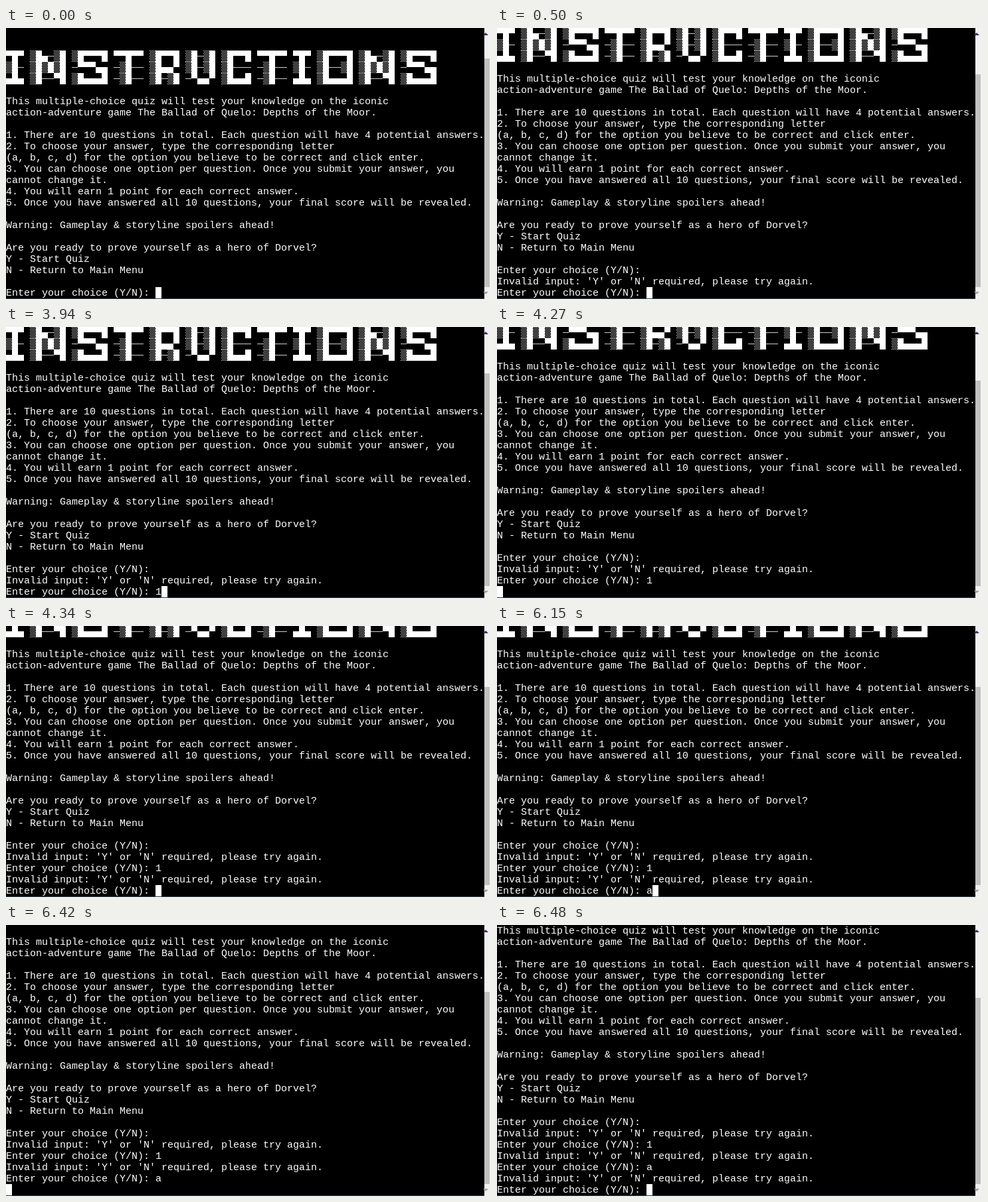
Recreate the animation shown at these times as an HTML page with a canvas. Size 730 px wide and 409 px high, loop 8 s.

```html
<!DOCTYPE html>
<html lang="en">
<head>
<meta charset="utf-8">
<style>
  html, body { margin: 0; overflow: hidden; background: #000; }
  canvas { display: block; }
</style>
</head>
<body>
<canvas id="screen" width="730" height="409"></canvas>
<script>
const ctx = document.getElementById('screen').getContext('2d');
const LOOP = 8000, COL = 9, ROW = 17, ROWS = 24, SCROLLED_OFF = 2;

const PROMPT = 'Enter your choice (Y/N): ';
const RETRY = "Invalid input: 'Y' or 'N' required, please try again.\n" + PROMPT;
const INTRO = `

▀█▀ ▒█▄─▒█ ▒█▀▀▀█ ▀▀█▀▀ ▒█▀▀█ ▒█─▒█ ▒█▀▀█ ▀▀█▀▀ ▀█▀ ▒█▀▀▀█ ▒█▄─▒█ ▒█▀▀▀█
▒█─ ▒█▒█▒█ ─▀▀▀▄▄ ─▒█── ▒█▄▄▀ ▒█─▒█ ▒█─── ─▒█── ▒█─ ▒█──▒█ ▒█▒█▒█ ─▀▀▀▄▄
▄█▄ ▒█──▀█ ▒█▄▄▄█ ─▒█── ▒█─▒█ ─▀▄▄▀ ▒█▄▄█ ─▒█── ▄█▄ ▒█▄▄▄█ ▒█──▀█ ▒█▄▄▄█

This multiple-choice quiz will test your knowledge on the iconic
action-adventure game The Ballad of Quelo: Depths of the Moor.

1. There are 10 questions in total. Each question will have 4 potential answers.
2. To choose your answer, type the corresponding letter
(a, b, c, d) for the option you believe to be correct and click enter.
3. You can choose one option per question. Once you submit your answer, you
cannot change it.
4. You will earn 1 point for each correct answer.
5. Once you have answered all 10 questions, your final score will be revealed.

Warning: Gameplay & storyline spoilers ahead!

Are you ready to prove yourself as a hero of Dorvel?
Y - Start Quiz
N - Return to Main Menu

${PROMPT}`;

// Terminal output in order: [time in ms, appended text]
const OUTPUT = [
  [0, INTRO],
  [500, '\n' + RETRY],
  [3940, '1'],
  [4270, '\n'],
  [4340, RETRY],
  [6150, 'a'],
  [6420, '\n'],
  [6480, RETRY],
];

function rect(color, x, y, w, h) {
  ctx.fillStyle = color;
  ctx.fillRect(x, y, w, h);
}

function drawBlock(char, x, y) {
  if (char === '█') rect('#fff', x, y, COL, ROW);
  if (char === '▀') rect('#fff', x, y, COL, 8);
  if (char === '▄') rect('#fff', x, y + 8, COL, 9);
  if (char === '─') rect('#ccc', x, y + 8, COL, 1);
  if (char === '▒') {
    for (let dy = 0; dy < ROW; dy += 2)
      for (let dx = dy / 2 % 2; dx < COL; dx += 2) rect('#fff', x + dx, y + dy, 1, 1);
  }
}

function drawLine(line, y) {
  if (line.includes('█')) {
    [...line].forEach((char, i) => drawBlock(char, i * COL, y));
  } else {
    ctx.fillStyle = '#fff';
    ctx.fillText(line, 0, y + 13);
  }
}

function drawArrow(color, baseY, tipY) {
  ctx.fillStyle = color;
  ctx.beginPath();
  ctx.moveTo(718, baseY);
  ctx.lineTo(722, tipY);
  ctx.lineTo(726, baseY);
  ctx.fill();
}

function drawScrollbar(lineCount) {
  const top = 17, bottom = 391;
  const thumb = Math.round((bottom - top) * ROWS / lineCount);
  rect('#f1f1f1', 720, 0, 10, 409);
  rect('#c1c1c1', 720, bottom - thumb, 8, thumb);
  drawArrow('#4b2a5c', 11, 7);
  drawArrow('#a3a3a3', 398, 402);
}

function draw(time) {
  const text = OUTPUT.filter(([start]) => start <= time).map(([, s]) => s).join('');
  const lines = text.split('\n');
  const visible = lines.slice(-ROWS);

  rect('#000', 0, 0, 730, 409);
  ctx.font = '15px "Liberation Mono", "Courier New", monospace';
  visible.forEach((line, i) => drawLine(line, i * ROW));
  rect('#fff', visible[ROWS - 1].length * COL, (ROWS - 1) * ROW, COL, ROW);
  rect('#23414f', 0, 408, 720, 1);
  drawScrollbar(lines.length + SCROLLED_OFF);
}

const startTime = performance.now();
function tick() {
  draw((performance.now() - startTime) % LOOP);
  requestAnimationFrame(tick);
}
tick();
</script>
</body>
</html>
```
